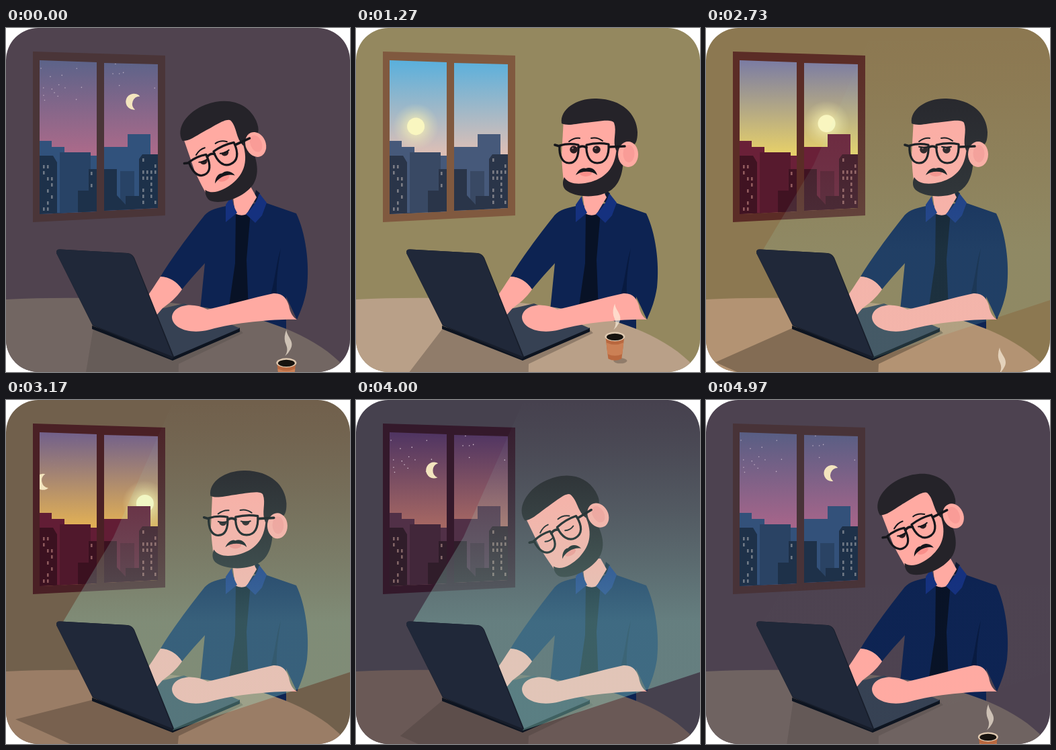
Animation, 512 px wide and 512 px high, one loop 5.01 s. Source, as an HTML page with a canvas:

```html
<!DOCTYPE html>
<html lang="en">
<head>
<meta charset="utf-8">
<title>Long day at the laptop</title>
<style>
html, body { margin: 0; width: 100%; height: 100%; overflow: hidden; background: #fff; }
canvas { display: block; width: 100vw; height: 100vh; }
</style>
</head>
<body>
<canvas id="stage"></canvas>
<script>
const LOOP = 5010;
const canvas = document.getElementById('stage');
const ctx = canvas.getContext('2d');
const dpr = window.devicePixelRatio || 1;
canvas.width = canvas.height = 512 * dpr;

const SKIN = '#ffaaa2', HAIR = '#252329', NAVY = '#0d2352', COLLAR = '#15317f', INK = '#15161b';

// Colours at dawn, noon, afternoon, sunset, dusk and night
const HOURS = [0, 1270, 2130, 2730, 3570, 4530, LOOP];
const PALETTE = {
  wall:   '50434f 94885f a6a76a 8c7851 594b48 2f3456',
  table:  '726662 b9a088 c4ac92 b39373 84695a 4a4551',
  frame:  '4a3538 80593f 7d563c 5b2c26 3b1625 2c1d33',
  skyTop: '5d6389 5bb0dc 4aa5d3 7c7da3 6b4774 2e204c',
  skyLow: 'ab6a8a dcbfb6 dde8c3 e5cf6a dc9244 623288',
  far:    '31527c 46597a 58525f 6a2038 5a1a33 454a5f'
};
for (const name in PALETTE)
  PALETTE[name] = PALETTE[name].split(' ').map(h => [0, 2, 4].map(i => parseInt(h.substr(i, 2), 16)));

const mix = (a, b, k) => a.map((v, i) => v + (b[i] - v) * k);
const css = c => `rgb(${c.map(Math.round)})`;

function hue(name, t) {
  const i = HOURS.findIndex((h, n) => t < HOURS[n + 1]), list = PALETTE[name];
  return mix(list[i], list[(i + 1) % list.length], (t - HOURS[i]) / (HOURS[i + 1] - HOURS[i]));
}

function ease(t, from, to) {
  const u = Math.min(1, Math.max(0, (t - from) / (to - from)));
  return u * u * (3 - 2 * u);
}

// Rises over a..b and falls over c..d, which may run past the loop's end
function bump(t, a, b, c, d) {
  const late = t < a ? t + LOOP : t;
  return ease(late, a, b) - ease(late, c, d);
}

function seeded(seed) {
  return () => (seed = seed * 16807 % 2147483647) / 2147483647;
}

const paths = {};
const path = d => paths[d] || (paths[d] = new Path2D(d));
function fill(d, color) { ctx.fillStyle = color; ctx.fill(path(d)); }
function line(d, color, width) {
  ctx.strokeStyle = color;
  ctx.lineWidth = width;
  ctx.lineCap = ctx.lineJoin = 'round';
  ctx.stroke(path(d));
}
function oval(x, y, rx, ry, color) {
  ctx.fillStyle = color;
  ctx.beginPath();
  ctx.ellipse(x, y, rx, ry, 0, 0, 7);
  ctx.fill();
}

function drawStars(t) {
  const rnd = seeded(77);
  ctx.globalAlpha = bump(t, 3000, 4300, 4500, 5700);
  for (let i = 0; i < 22; i++) oval(52 + rnd() * 172, 53 + rnd() * 55, .8, .8, '#e8d8e4');
  ctx.globalAlpha = 1;
}

function drawSun(t) {
  const x = 89 + .062 * (t - 1270), y = 136 + .004 * (x - 140) ** 2;
  const glow = ctx.createRadialGradient(x, y, 10, x, y, 34);
  glow.addColorStop(0, 'rgba(250,244,180,.65)');
  glow.addColorStop(.6, 'rgba(250,244,180,.22)');
  glow.addColorStop(1, 'rgba(250,244,180,0)');
  oval(x, y, 34, 34, glow);
  oval(x, y, 13, 13, '#f9f6c0');
}

function drawMoon(t) {
  const x = 190 + .0735 * (t > 2600 ? t - LOOP : t);
  ctx.save();
  ctx.translate(x, 103 + .0026 * (x - 140) ** 2);
  ctx.rotate((x - 84) * .0042);
  fill('M5-11A12 12 0 1 0 7 10A11.2 11.2 0 0 1 5-11Z', '#f3e4be');
  ctx.restore();
}

function lamps(x, y, cols, rows, seed, color) {
  const rnd = seeded(seed);
  ctx.fillStyle = color;
  for (let i = 0; i < cols * rows; i++)
    if (rnd() < .42) ctx.fillRect(x + i % cols * 6, y + Math.floor(i / cols) * 9, 2.6, 5);
}

function drawWindow(t) {
  fill('M40 35L237 41V279L40 289Z', css(hue('frame', t)));
  ctx.save();
  ctx.clip(path('M50 48L135 51V273L50 277ZM146 52L226 54V268L146 272Z'));
  const sky = ctx.createLinearGradient(0, 50, 0, 185);
  sky.addColorStop(0, css(hue('skyTop', t)));
  sky.addColorStop(1, css(hue('skyLow', t)));
  ctx.fillStyle = sky;
  ctx.fillRect(40, 40, 200, 250);
  drawStars(t);
  drawSun(t);
  drawMoon(t);
  const far = hue('far', t), black = [0, 0, 0];
  const mid = css(mix(far, black, .18)), near = css(mix(far, black, .4));
  const lamp = css(mix(far, [205, 180, 150], .4));
  fill('M50 290V168H68V177H87V190H146V177H181V158H215V290Z', css(far));
  fill('M80 290V185H126V290ZM170 290V213H191V290Z', mid);
  fill('M50 290V190H70L76 200V275H107V242H123V210H165V249L178 263V250H198V195L203 188H226V290Z', near);
  lamps(55, 204, 3, 8, 31, lamp);
  lamps(203, 194, 4, 8, 58, lamp);
  lamps(126, 214, 1, 4, 12, lamp);
  ctx.restore();
}

function drawBody() {
  fill('M327 265C309 269 300 272 293 282C272 308 245 345 230 370Q248 370 262 389C274 374 286 361 296 350L287 440L417 452V400L433 434C440 418 445 405 448 386C452 350 446 305 432 276L386 260Z', NAVY);
  fill('M409 328C406 350 402 370 403 396L394 397C401 372 402 350 409 328Z', '#081a40');
  fill('M342 274L364 274L358 345L361 420L331 420L341 350Z', '#081226');
  fill('M372 241L378 246L376 262L368 258Z', '#101b33');
  fill('M336 236H364L373 252L358 277Q350 281 341 276Z', SKIN);
  fill('M336 250L327 263V289L344 275Q337 263 336 250Z', COLLAR);
  fill('M377 246L388 260L381 279L371 290L357 277Q372 264 377 246Z', COLLAR);
}

function drawArms() {
  fill('M230 370Q250 371 262 389C254 401 243 410 233 417L222 430L207 404C215 393 222 382 230 370Z', SKIN);
  fill('M433 434C410 433 345 437 303 449C272 457 247 446 247 430C249 412 277 407 300 419C330 412 370 401 398 395C412 394 418 403 421 413C423 425 428 431 433 434Z', SKIN);
}

function drawEye(x, y, lid) {
  oval(x, y, 5.8, 5.8, '#2a1e22');
  oval(x - 1.5, y - 2, 1.3, 1.3, '#8a6a6c');
  if (lid < .02) return;
  const edge = y - 6 + lid * 10;
  ctx.fillStyle = SKIN;
  ctx.fillRect(x - 7, y - 8, 14, edge - y + 7 + 8 * ease(lid, .7, .9));
  ctx.strokeStyle = INK;
  ctx.lineWidth = 2;
  ctx.lineCap = 'round';
  ctx.beginPath();
  ctx.moveTo(x - 7, edge - 1);
  ctx.quadraticCurveTo(x, edge + 2.5 * lid, x + 7, edge - 1);
  ctx.stroke();
}

function drawHead(t) {
  const tilt = -40 * bump(t, 3050, 4500, 4500, 5600);
  const lid = bump(t, 2100, 3900, 4500, 5800);
  ctx.save();
  ctx.translate(351, 266);
  ctx.rotate(tilt * Math.PI / 180);
  ctx.translate(-351, -266);
  fill('M309 136L306 190Q307 215 310 234Q345 250 380 230L395 190L388 132Z', SKIN);
  fill('M306 142C303 120 330 104 358 105C396 106 418 128 419 155C419 172 414 178 404 173L397 186L387 182C381 168 389 154 384 141C380 134 356 140 341 141C325 143 315 146 306 142Z', HAIR);
  fill('M388 172H397C400 206 396 229 380 241C360 255 325 252 312 241C307 236 307 229 310 222C317 234 335 233 350 229C373 222 388 206 388 172Z', HAIR);
  oval(405, 188, 15, 19, SKIN);
  oval(406, 187, 8.5, 13, '#f99c97');
  oval(342, 216, 9, 5, '#f98f8a');
  fill('M327 219C331 210 338 207 342 209C350 206 357 211 359 219C351 212 336 212 327 219Z', INK);
  drawEye(324, 181, lid);
  drawEye(358, 181, lid);
  line('M317 169Q325 163 333 164M350 164Q359 162 367 168', INK, 2);
  line('M303 175Q317 171 331 174C332 192 327 201 317 201C307 201 302 190 303 175ZM343 174Q360 170 376 173C377 191 371 201 359 201C348 201 342 190 343 174Z', INK, 3.2);
  line('M331 178Q337 174 343 178M377 177L400 176M303 176L296 174', INK, 3.6);
  ctx.restore();
}

function drawTable(t) {
  fill('M0 404C170 396 425 404 510 512H0Z', css(hue('table', t)));
  const swing = t < 4530
    ? Math.min(1, (t + 480) / 2610) * (1 - ease(t, 3570, 4530))
    : (t - 4530) / 2610;
  const x = 136 - 122 * swing;
  const y = 545 - 78 * bump(t, 1600, 3570, 3570, 4530);
  ctx.fillStyle = shade(t);
  ctx.beginPath();
  [[130, 446], [x, y], [x + 100, y + 45], [255, y + 45], [257, 500], [353, 454], [345, 446]]
    .forEach(p => ctx.lineTo(...p));
  ctx.fill();
}

// Shadows deepen while the sun is up
function shade(t) {
  return `rgba(0,0,0,${.1 + .18 * bump(t, 200, 1900, 2400, 4500)})`;
}

function drawBeam(t) {
  const power = .33 * bump(t, 2150, 3500, 4270, LOOP);
  const light = ctx.createLinearGradient(0, 0, 0, 330);
  for (let u = 0; u <= 1; u += .125)
    light.addColorStop(u, `rgba(165,252,228,${power * u ** 1.3})`);
  fill('M85 330L160 204L250 0H512V405L248 492Z', light);
}

function drawLaptop() {
  fill('M128 443L248 488L348 446V452L248 495L128 448Z', '#0d1420');
  fill('M222 420L265 410L348 447L248 490Z', '#364153');
}

function drawLid() {
  fill('M75 335Q74 329 81 329.5L181 335Q188 336 191 342L250 489L247 493L129 443Z', '#171d2a');
  fill('M75 335Q74 329 81 329.5L180 335Q187 336 190 342L248 489L129 442Z', '#202839');
}

// Glides in from the lower right, rests, then speeds away again
function drawCup(t) {
  const late = t > 3900 ? t : t + LOOP;
  const arriving = 81 * Math.exp((4530 - late) / 600);
  const leaving = 48 * Math.max(0, (late - LOOP - 1650) / 1000) ** 2.3;
  const away = arriving + leaving;
  ctx.save();
  ctx.translate(381 + away, 454 + 1.22 * away);
  oval(8, 36, 10, 4, shade(t));
  fill('M-14 0L-10 33Q0 38 10 33L14 0Z', '#b9683f');
  fill('M-13 9Q0 15 13 9L11 26Q0 31-11 26Z', '#cb8055');
  oval(0, 0, 15, 7, '#dfc9b0');
  oval(0, .5, 12.5, 5.2, '#17130f');
  ctx.globalAlpha = .65;
  ctx.transform(1, 0, .04 * Math.sin(t / LOOP * Math.PI * 8), 1, 0, 0);
  fill('M0-49C1-38 13-32 6-20Q3-14-2-10C4-20 0-25-2-31Q-4-39 0-49Z', '#fff4e2');
  ctx.restore();
}

function draw(t) {
  ctx.setTransform(dpr, 0, 0, dpr, 0, 0);
  ctx.clearRect(0, 0, 512, 512);
  ctx.save();
  ctx.beginPath();
  ctx.roundRect(0, 0, 512, 512, 48);
  ctx.clip();
  ctx.fillStyle = css(hue('wall', t));
  ctx.fillRect(0, 0, 512, 512);
  drawWindow(t);
  drawBody();
  drawHead(t);
  drawTable(t);
  drawLaptop();
  drawArms();
  drawBeam(t);
  drawLid();
  drawCup(t);
  ctx.restore();
}

const start = performance.now();
function tick() {
  draw(Math.max(0, performance.now() - start) % LOOP);
  requestAnimationFrame(tick);
}
tick();
</script>
</body>
</html>
```
